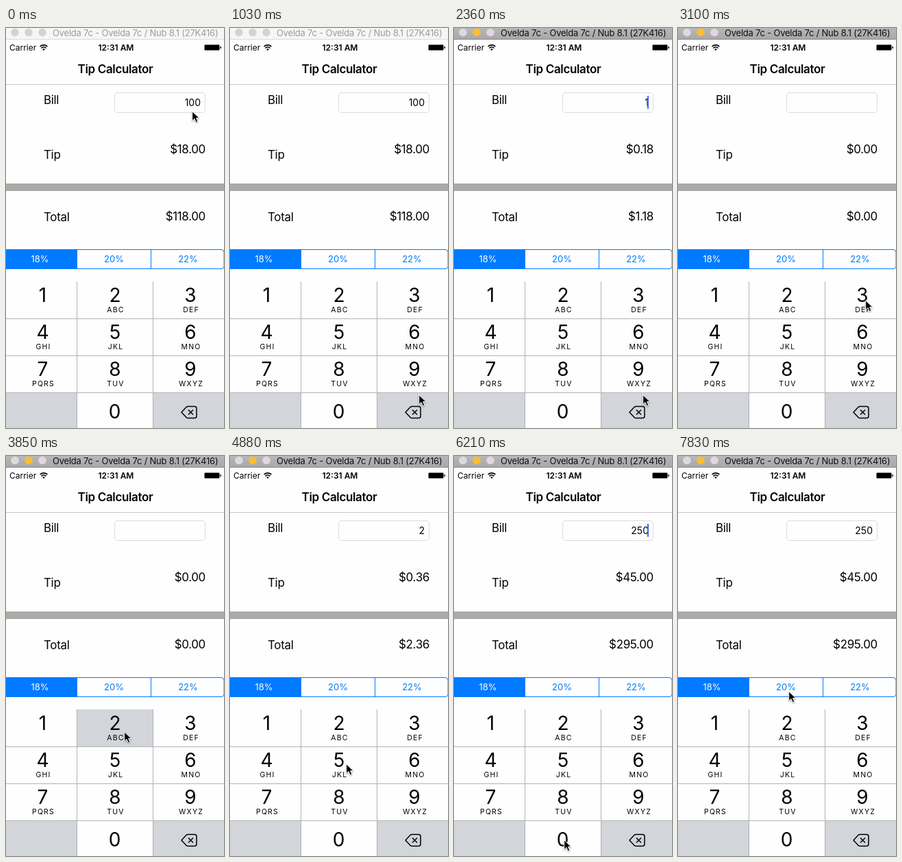
Write an HTML page that moves like this. It is 318x584 px and loops after 8000 ms.

```html
<!DOCTYPE html>
<html lang="en">
<head>
<meta charset="utf-8">
<title>Tip Calculator</title>
<style>
html, body { margin: 0; width: 100%; height: 100%; overflow: hidden; background: #fefefe; }
svg { display: block; font-family: Inter, "Liberation Sans", sans-serif; }
.label { font-size: 17px; letter-spacing: -.35px; }
.end { text-anchor: end; }
.mid, .digit, .abc { text-anchor: middle; }
.digit { font-size: 28px; }
.abc { font-size: 10.5px; letter-spacing: 1.2px; }
.seg { font-size: 13px; fill: #007aff; }
#cursor { filter: drop-shadow(0 1px 1px #0006); }
</style>
</head>
<body>
<svg width="318" height="584" viewBox="0 0 318 584">
  <defs>
    <linearGradient id="bar" x2="0" y2="1">
      <stop stop-color="#b8b6b8"/><stop offset="1" stop-color="#a8a6a8"/>
    </linearGradient>
  </defs>
  <rect width="318" height="584" fill="#fefefe"/>

  <rect id="titleBar" width="318" height="17"/>
  <path id="titleEdge" d="M0 16.5H318"/>
  <g id="lights"><circle cx="13" cy="6.5" r="5.8"/><circle cx="33" cy="6.5" r="5.8"/><circle cx="53" cy="6.5" r="5.8"/></g>
  <text id="title" x="68" y="12" font-size="13" letter-spacing="-.22">Ovelda 7c - Ovelda 7c / Nub 8.1 (27K416)</text>

  <text x="5" y="32.5" font-size="12">Carrier</text>
  <g fill="none" stroke="#000" stroke-width="1.7">
    <path d="M49.5 27a8 8 0 0 1 11 0M51.5 29.4a5 5 0 0 1 7 0"/>
    <path d="M53.2 31l1.8 2.2 1.8-2.2q-1.8-1.3-3.6 0z" fill="#000" stroke="none"/>
  </g>
  <text class="mid" x="160.5" y="32.5" font-size="12" font-weight="600">12:31 AM</text>
  <rect x="289.5" y="24.5" width="22" height="8" rx="1.5" stroke="#777"/>
  <rect x="312.5" y="27" width="1.5" height="3" rx=".7"/>
  <text class="mid" x="159.5" y="66" font-size="17" font-weight="600" letter-spacing="-.35">Tip Calculator</text>
  <path d="M0 82.5H318" stroke="#c8c8c8"/>

  <g class="label">
    <text x="55" y="110.5">Bill</text>
    <text x="55" y="190.5">Tip</text>
    <text x="55" y="281.5">Total</text>
    <text id="tip" class="end" x="291" y="182.5"/>
    <text id="total" class="end" x="291" y="280.5"/>
  </g>
  <rect x="158.5" y="94.5" width="132" height="29" rx="4.5" fill="#fefefe" stroke="#dcdcdc"/>
  <text id="bill" class="end" x="284" y="113.8" font-size="14"/>
  <rect id="caret" x="282" y="99" width="2" height="19" fill="#426bf2"/>
  <rect y="227" width="318" height="11" fill="#a9aaa9"/>

  <path d="M0 323.5H314q4 0 4 4V348q0 3.5-4 3.5H0M211.5 323V352" fill="none" stroke="#007aff"/>
  <rect y="323" width="104" height="29" fill="#007aff"/>
  <g class="seg mid">
    <text x="49.5" y="342.2" style="fill:#fff">18%</text>
    <text x="157.5" y="342.2">20%</text>
    <text x="265.5" y="342.2">22%</text>
  </g>

  <rect y="533" width="103" height="51" fill="#d2d5da"/>
  <rect id="deleteKey" x="215" y="533" width="103" height="51"/>
  <rect id="pressed" x="104" width="110" height="54" fill="#d2d5da"/>
  <path d="M0 424.5H318M0 478.5H318M0 532.5H318M103.5 370V584M214.5 370V584" stroke="#b2b2b2"/>
  <g id="keys"></g>
  <g fill="none" stroke-width="1.5" stroke-linejoin="round">
    <path id="deleteShape" d="M256 561l7-7.4q1-1.1 2.5-1.1H275q3 0 3 3v11q0 3-3 3h-9.5q-1.5 0-2.5-1.1z" stroke="#000"/>
    <path id="deleteCross" d="M266 557.5l7 7m0-7l-7 7"/>
  </g>

  <path id="cursor" d="M.7.8V14.6L4 11.5 6.3 16.8 8.8 15.7 6.6 10.6H11z" stroke="#fff"/>
</svg>
<script>
const LOOP = 8000, TICK = 147.6;
const $ = id => document.getElementById(id);

// All keyframes below start with a tick number.
const path = [
  [1, 271, 121], [7, 275, 535], [17, 275, 535], [21, 273, 397],
  [22, 201, 399], [23, 172, 402], [27, 172, 402], [31, 170, 456],
  [33, 169, 449], [35, 169, 449], [41, 160, 560], [44, 160, 560], [52, 161, 343]
];
const bills = [[0, "100"], [11, "10"], [16, "1"], [17, ""], [27, "2"], [35, "25"], [42, "250"]];
const caretFlips = [9, 15, 16, 20, 23, 26, 27, 30, 34, 38, 42, 45, 49, 53];
const presses = { 26: 370, 34: 424 };
const ACTIVATE = 8, DELETE = 11;

const letters = ["", "ABC", "DEF", "GHI", "JKL", "MNO", "PQRS", "TUV", "WXYZ"];
const key = (digit, x, y, abc = "") =>
  `<text class="digit" x="${x}" y="${y}">${digit}</text>` +
  `<text class="abc" x="${x + 1}" y="${y + 15}">${abc}</text>`;
$("keys").innerHTML = letters.map((abc, i) =>
  key(i + 1, [53.5, 159, 269][i % 3], 400 + 54 * Math.floor(i / 3), abc)
).join("") + key(0, 158.5, 569.5);

function cursorAt(tick) {
  const next = path.findIndex(p => p[0] > tick);
  if (next === 0) return path[0].slice(1);
  if (next < 0) return path.at(-1).slice(1);
  const a = path[next - 1], b = path[next];
  const u = (tick - a[0]) / (b[0] - a[0]), ease = u * u * (3 - 2 * u);
  return [1, 2].map(i => a[i] + (b[i] - a[i]) * ease);
}

const set = (id, name, value) => $(id).setAttribute(name, value);
const show = (id, on) => set(id, "visibility", on ? "visible" : "hidden");

function draw(now) {
  const tick = Math.floor((now % LOOP) / TICK + 0.1);
  const active = tick >= ACTIVATE, deleting = tick === DELETE;
  const bill = bills.findLast(b => b[0] <= tick)[1];

  set("titleBar", "fill", active ? "url(#bar)" : "#f6f6f6");
  set("titleEdge", "stroke", active ? "#8c8a8c" : "#dadada");
  set("title", "fill", active ? "#111" : "#9c9c9c");
  [...$("lights").children].forEach((c, i) =>
    c.setAttribute("fill", !active ? "#d3d3d3" : i === 1 ? "#fdbd2e" : "#dcdadc"));

  $("bill").textContent = bill;
  $("tip").textContent = "$" + (bill * 0.18).toFixed(2);
  $("total").textContent = "$" + (bill * 1.18).toFixed(2);
  show("caret", caretFlips.filter(f => f <= tick).length % 2);

  show("pressed", tick in presses);
  set("pressed", "y", presses[tick] || 0);
  set("deleteKey", "fill", deleting ? "#fefefe" : "#d2d5da");
  set("deleteShape", "fill", deleting ? "#000" : "none");
  set("deleteShape", "stroke-width", deleting ? 3.5 : 1.5);
  set("deleteCross", "stroke", deleting ? "#fff" : "#000");

  set("cursor", "transform", `translate(${cursorAt(tick)})`);
}

let start;
function frame(now) {
  start ??= now;
  draw(now - start);
  requestAnimationFrame(frame);
}
draw(0);
requestAnimationFrame(frame);
</script>
</body>
</html>
```
